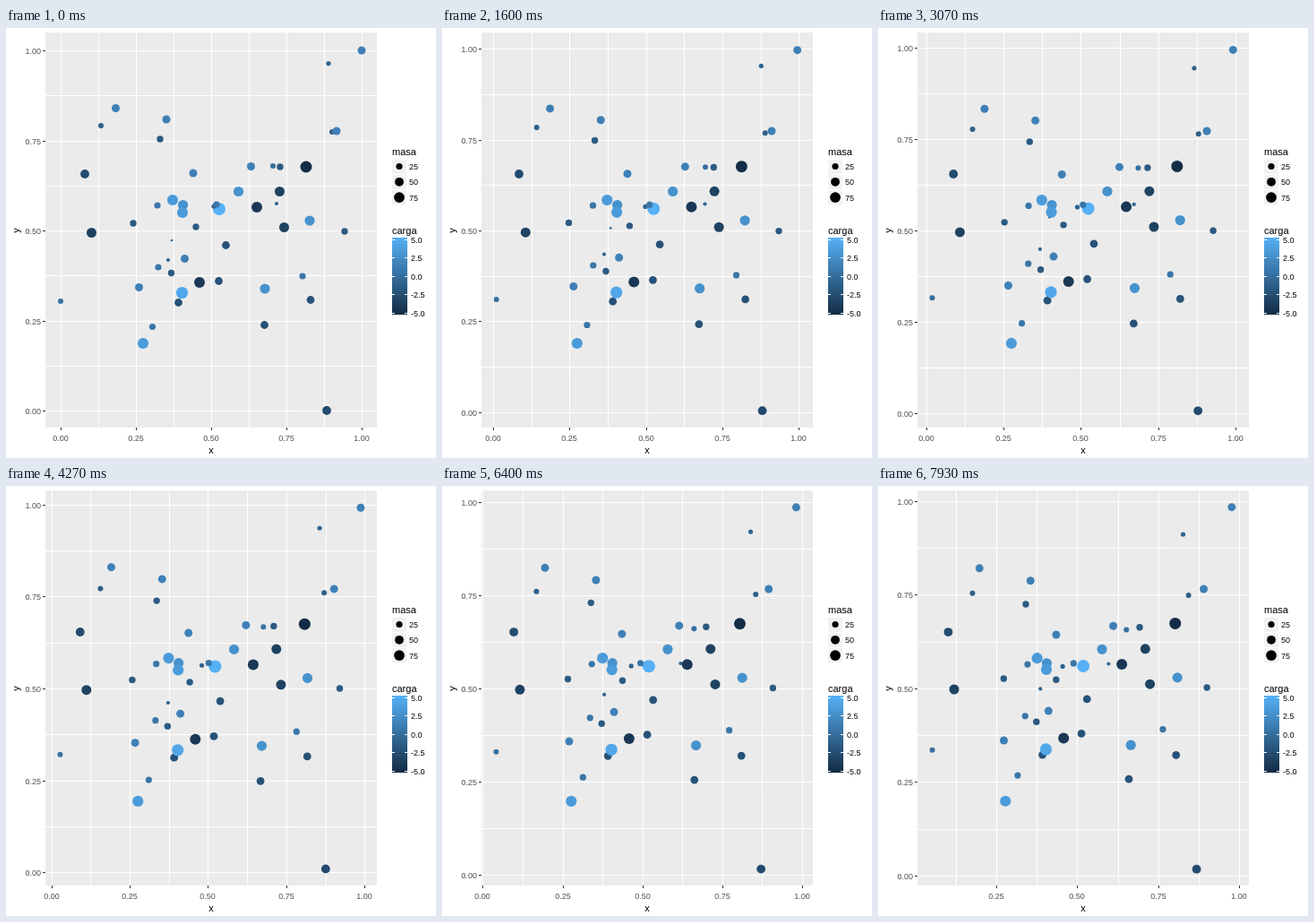
An HTML page with a canvas for the animation above (8 s loop, 480 px wide and 480 px high).

```html
<!DOCTYPE html>
<html lang="es">
<head>
<meta charset="utf-8">
<style>
html, body { margin: 0; height: 100%; overflow: hidden; background: #fff; }
canvas { display: block; }
</style>
</head>
<body>
<canvas id="stage" width="480" height="480"></canvas>
<script>
const ctx = document.getElementById('stage').getContext('2d');
const LOOP = 8000, STEP = 100;
const PANEL = { left: 44, top: 5, right: 414, bottom: 446 };
const CENTRE = { x: 197, y: 206 };
const PULL = 230, SOFTENING = 30;
const LOW = [19, 43, 67], HIGH = [86, 177, 247];

const shade = carga => {
  const k = (carga + 5.1) / 10.2;
  return `rgb(${LOW.map((v, i) => Math.round(v + (HIGH[i] - v) * k))})`;
};

// The axes keep fitting the shrinking cloud, so the view slowly zooms in.
const zoomX = (x, p) => 317 + (x - 317) * (1 + 0.0753 * p);
const zoomY = (y, p) => 232.5 + (y - 232.5) * (1 + 0.041 * p);

// Charge grows with size; the sign tells light dots from dark ones.
const dots = [];
function group(sign, radius, ...places) {
  const color = shade(sign * 0.042 * radius ** 2.5 - 0.4);
  for (const [x, y] of places) dots.push({ x, y, radius, color });
}

group(1, 7, [238, 202]);
group(-1, 1.3, [185, 237]);
group(-1, 2.1, [302, 196], [181, 259]);
group(-1, 2.6, [360, 39.5], [232, 199]);
group(-1, 3, [106, 109], [364, 116]);
group(1, 3, [298, 154], [61, 305]);
group(1, 3.6, [331, 277], [163.5, 333.5], [170, 267], [169, 198], [235, 197]);
group(-1, 3.7, [306, 155], [378, 227], [184.5, 273.5], [212, 222], [142, 218], [172, 124]);
group(-1, 4.4, [340, 303.5], [288.5, 331.5], [245.5, 242.5], [237.5, 282.5], [192.5, 306.5]);
group(1, 4.5, [397, 25], [369, 115], [122.5, 89.5], [209, 162], [179, 102],
  [273.5, 154.5], [199.5, 257.5], [148.5, 289.5]);
group(-1, 4.9, [88, 163], [358, 427]);
group(-1, 5.5, [305.5, 182.5], [310.5, 222.5], [95.5, 228.5]);
group(1, 5.6, [259.5, 182.5], [339, 215], [289, 291], [197.5, 197.5]);
group(-1, 6, [280, 200], [216, 284]);
group(1, 6.1, [197, 206], [186, 192], [153, 352]);
group(-1, 6.5, [335, 155]);
group(1, 6.6, [196.5, 295.5]);

function rect(x, y, w, h, color) {
  ctx.fillStyle = color;
  ctx.fillRect(x, y, w, h);
}

function disc(x, y, radius, color) {
  ctx.fillStyle = color;
  ctx.beginPath();
  ctx.arc(x, y, radius, 0, 2 * Math.PI);
  ctx.fill();
}

function label(text, x, y, size, color = '#000', align = 'left') {
  ctx.font = `${size}px "Liberation Sans", Arial, sans-serif`;
  ctx.textAlign = align;
  ctx.fillStyle = color;
  ctx.fillText(text, x, y);
}

function drawAxes(p) {
  const { left, top, right, bottom } = PANEL;
  rect(left, top, right - left, bottom - top, '#ebebeb');
  for (let i = 0; i <= 8; i++) {
    const v = i / 8, major = i % 2 === 0;
    const x = Math.round(zoomX(61 + 336 * v, p));
    const y = Math.round(zoomY(427.1 - 402 * v, p));
    if (x >= left) {
      rect(x, top, 1, bottom - top, '#fff');
      if (major) {
        rect(x, bottom, 1, 3, '#333');
        label(v.toFixed(2), x, 461, 9, '#4d4d4d', 'center');
      }
    }
    rect(left, y, right - left, 1, '#fff');
    if (major) {
      rect(left - 3, y, 3, 1, '#333');
      label(v.toFixed(2), 39, y + 4, 9, '#4d4d4d', 'right');
    }
  }
  label('x', 229, 475, 11, '#000', 'center');
  ctx.save();
  ctx.translate(15, 226);
  ctx.rotate(-Math.PI / 2);
  label('y', 0, 0, 11, '#000', 'center');
  ctx.restore();
}

// Every dot falls towards the centre; the lighter it is, the faster.
function drawDot({ x, y, radius, color }, p) {
  const dx = CENTRE.x - x, dy = CENTRE.y - y;
  const speed = PULL / (Math.hypot(dx, dy) + SOFTENING) / radius ** 2;
  const k = Math.min(1, p * speed);
  disc(zoomX(x + dx * k, p), zoomY(y + dy * k, p), radius, color);
}

function drawLegend() {
  label('masa', 431, 142, 11);
  [3.6, 4.9, 5.9].forEach((radius, i) => {
    const y = 154.5 + 17.3 * i;
    rect(431, Math.round(y - 8), 16, 16, '#f2f2f2');
    disc(439, y, radius, '#000');
    label(25 * (i + 1), 450, Math.round(y + 3.5), 9);
  });

  label('carga', 431, 230, 11);
  const bar = ctx.createLinearGradient(0, 234, 0, 320);
  bar.addColorStop(0, shade(5.1));
  bar.addColorStop(1, shade(-5.1));
  rect(431, 234, 17, 86, bar);
  for (let i = 0; i < 5; i++) {
    const y = Math.round(236 + 20.4 * i);
    rect(431, y, 3, 1, '#fff');
    rect(445, y, 3, 1, '#fff');
    label((5 - 2.5 * i).toFixed(1), 452, y + 4, 9);
  }
}

function draw(now) {
  const p = Math.floor(now % LOOP / STEP) * STEP / (LOOP - STEP);
  rect(0, 0, 480, 480, '#fff');
  drawAxes(p);
  for (const dot of dots) drawDot(dot, p);
  drawLegend();
  requestAnimationFrame(draw);
}
requestAnimationFrame(draw);
</script>
</body>
</html>
```
